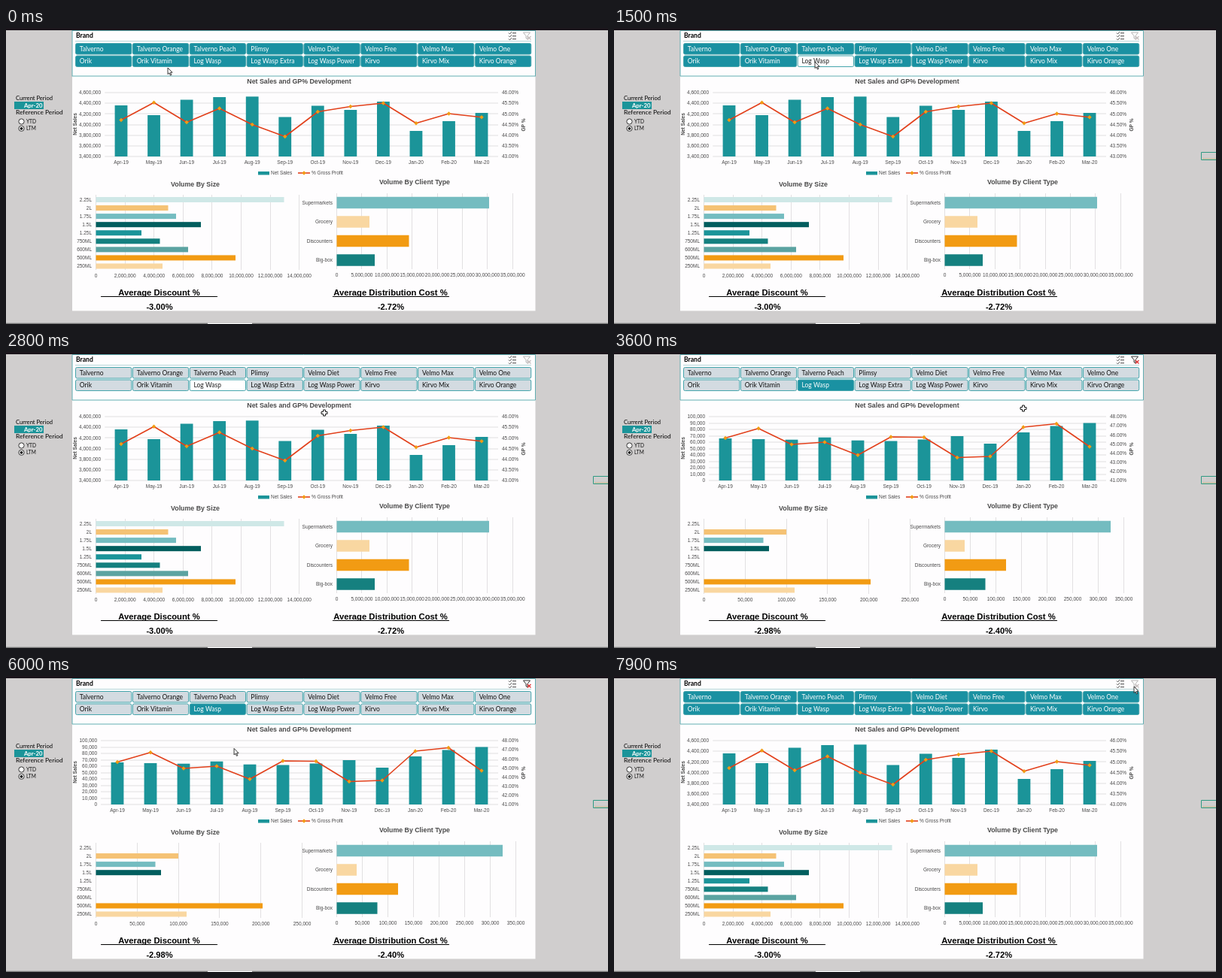
Animation, 800 px wide and 394 px high, one loop 8000 ms. Source, as an HTML page with a canvas:

```html
<!DOCTYPE html>
<html lang="en">
<head>
<meta charset="utf-8">
<title>Sales dashboard</title>
<style>
html, body { margin: 0; width: 100%; height: 100%; overflow: hidden; background: #d0cece; }
canvas { display: block; }
</style>
</head>
<body>
<canvas width="800" height="394"></canvas>
<script>
const ctx = document.querySelector('canvas').getContext('2d');
const TEAL = '#1b9499', BUTTON = '#1a91a2', RED = '#e2401b', GOLD = '#f29b13', INK = '#4a4a4a', GRID = '#e2e0e2';
const ARIAL = '"Liberation Sans", Arial, sans-serif';
const LATO = 'Lato, Carlito, sans-serif';
const MONTHS = 'Apr-19 May-19 Jun-19 Jul-19 Aug-19 Sep-19 Oct-19 Nov-19 Dec-19 Jan-20 Feb-20 Mar-20'.split(' ');
const SIZES = '2.25L 2L 1.75L 1.5L 1.25L 750ML 600ML 500ML 250ML'.split(' ');
const CLIENTS = ['Supermarkets', 'Grocery', 'Discounters', 'Big-box'];
const BRANDS = ['Talverno', 'Talverno Orange', 'Talverno Peach', 'Plimsy', 'Velmo Diet', 'Velmo Free', 'Velmo Max', 'Velmo One',
  'Orik', 'Orik Vitamin', 'Log Wasp', 'Log Wasp Extra', 'Log Wasp Power', 'Kirvo', 'Kirvo Mix', 'Kirvo Orange'];
const PICKED = 10;
const SIZE_COLORS = ['#cfe8e7', '#f5c274', '#74bcc0', '#025e5e', '#1b9499', '#15807f', '#5ba3a1', GOLD, '#f9d7a1'];
const CLIENT_COLORS = ['#74bcc0', '#f9d7a1', GOLD, '#15807f'];

// Bar and line values are pixel positions inside each plot.
const ALL = {
  first: 153, pitch: 43.55,
  sales: { max: 4600000, step: 200000, count: 7 },
  profit: { max: 46, step: .5, count: 7 },
  tops: [103, 116, 95.5, 92, 91.3, 118.5, 103.5, 109, 98, 137, 124, 113],
  line: [122.5, 99.3, 125.5, 107, 128.5, 144.5, 111.5, 104.5, 100, 126.7, 114, 118.7],
  sizes: [369.5, 215.5, 226, 259, 180, 204.5, 242, 305, 208], sizeAxis: [2000000, 7, 38.6],
  clients: [642, 483, 535.5, 490], clientAxis: [5000000, 7, 33.4],
  discount: '-3.00%', cost: '-2.72%'
};
const ONE = {
  first: 148, pitch: 44,
  sales: { max: 100000, step: 10000, count: 11 },
  profit: { max: 48, step: 1, count: 8 },
  tops: [115, 116, 116.7, 113.7, 117.7, 118.5, 116.5, 112, 122, 107, 98.5, 94.5],
  line: [114.5, 101.8, 123, 120, 137.3, 113, 113.5, 140.5, 139, 100, 95.5, 126],
  sizes: [0, 229, 198.5, 206, 0, 0, 0, 341, 240], sizeAxis: [50000, 5, 54.8],
  clients: [660, 466, 521, 493.5], clientAxis: [50000, 7, 34],
  discount: '-2.98%', cost: '-2.40%'
};

// time, x, y of the pointer
const PATH = [[0, 215, 53], [900, 240, 50], [1500, 267, 45], [1900, 267, 45], [2800, 423, 81], [3600, 544, 75],
  [4900, 106, 136], [5500, 112, 138], [6800, 691, 12], [7000, 693, 9], [7900, 691, 14], [8000, 691, 14]];

function rect(x, y, w, h, fill) {
  ctx.fillStyle = fill;
  ctx.fillRect(x, y, w, h);
}
function text(s, x, y, size, { align = 'left', color = INK, bold = false, font = ARIAL } = {}) {
  ctx.font = `${bold ? 'bold ' : ''}${size}px ${font}`;
  ctx.textAlign = align;
  ctx.textBaseline = 'alphabetic';
  ctx.fillStyle = color;
  ctx.fillText(s, x, y + size * .35);
}
function upright(s, x, y) {
  ctx.save();
  ctx.translate(x, y);
  ctx.rotate(-Math.PI / 2);
  text(s, 0, 0, 6.6, { align: 'center', bold: true });
  ctx.restore();
}
function stroke(points, color, width = 1) {
  ctx.beginPath();
  points.forEach(p => ctx.lineTo(...p));
  ctx.strokeStyle = color;
  ctx.lineWidth = width;
  ctx.stroke();
}
function shape(points, fill, outline, width = 1) {
  ctx.beginPath();
  points.forEach(p => ctx.lineTo(...p));
  ctx.closePath();
  ctx.fillStyle = fill;
  ctx.fill();
  if (!outline) return;
  ctx.strokeStyle = outline;
  ctx.lineWidth = width;
  ctx.stroke();
}
function diamond(x, y, r = 2.7) {
  shape([[x, y - r], [x + r, y], [x, y + r], [x - r, y]], GOLD);
}
const title = (s, x, y) => text(s, x, y, 8.8, { align: 'center', bold: true });
const number = n => n.toLocaleString('en-US');

function salesChart(d) {
  title('Net Sales and GP% Development', 389.5, 71);
  const left = d.first - d.pitch / 2;
  const ticks = ({ max, step, count }, draw) => {
    for (let i = 0; i < count; i++) draw(max - i * step, 86 + 85 * i / (count - 1));
  };
  ticks(d.sales, (v, y) => {
    rect(left, Math.round(y) - .5, 654 - left, 1, GRID);
    text(number(v), d === ALL ? 126 : 121, y, 6.5, { align: 'right' });
  });
  ticks(d.profit, (v, y) => text(v.toFixed(2) + '%', 659, y, 6.5));
  upright('Net Sales', 91.5, 128);
  upright('GP %', 688, 129);
  const x = i => d.first + i * d.pitch;
  MONTHS.forEach((m, i) => {
    rect(x(i) - 8.4, d.tops[i], 16.8, 171 - d.tops[i], TEAL);
    text(m, x(i), 179, 6.5, { align: 'center' });
  });
  const points = d.line.map((y, i) => [x(i), y]);
  ctx.lineJoin = 'round';
  stroke(points, RED, 1.6);
  points.forEach(p => diamond(...p));
  rect(335, 191, 15, 4.5, TEAL);
  text('Net Sales', 352, 193, 6.5);
  stroke([[388, 193], [404, 193]], RED, 1.6);
  diamond(396, 193);
  text('% Gross Profit', 406, 193, 6.5);
}

function barChart({ names, ends, colors, axis, x0, y0, pitch, thick, top, bottom, labelY }) {
  const [step, count, gap] = axis;
  for (let i = 0; i <= count; i++) {
    rect(Math.floor(x0 + i * gap), top, 1, bottom - top, GRID);
    text(number(i * step), x0 + i * gap, labelY, 6.5, { align: 'center' });
  }
  names.forEach((name, i) => {
    const y = y0 + i * pitch;
    if (ends[i]) rect(x0, y - thick / 2, ends[i] - x0, thick, colors[i]);
    text(name, x0 - 5.5, y, 6.5, { align: 'right' });
  });
}

function summary(label, value, x, left, valueX) {
  text(label, x, 352, 11.25, { align: 'center', color: '#000', bold: true });
  rect(left, 357, 155, 1, '#000');
  text(value, valueX, 371, 11.1, { align: 'center', color: '#000', bold: true });
}

function charts(d) {
  salesChart(d);
  title('Volume By Size', 251.5, 208);
  barChart({ names: SIZES, ends: d.sizes, colors: SIZE_COLORS, axis: d.sizeAxis,
    x0: 119.5, y0: 228.5, pitch: 11.06, thick: 7, top: 222, bottom: 322, labelY: 330 });
  title('Volume By Client Type', 543, 204.5);
  barChart({ names: CLIENTS, ends: d.clients, colors: CLIENT_COLORS, axis: d.clientAxis,
    x0: 439.5, y0: 232.5, pitch: 25.5, thick: 15.5, top: 220, bottom: 321, labelY: 329 });
  summary('Average Discount %', d.discount, 203.5, 126, 204);
  summary('Average Distribution Cost %', d.cost, 511, 434, 511.5);
}

function filterIcon(active, hover) {
  if (hover) {
    rect(686, 4, 12, 13, '#e0a030');
    rect(687, 5, 10, 11, '#ffd98a');
  }
  const fill = hover ? '#ffd98a' : '#fff';
  shape([[687.5, 6], [696.5, 6], [693, 10.5], [693, 15], [691, 13.5], [691, 10.5]], fill, active ? '#333' : '#b5b5b5');
  const color = active ? '#e03030' : '#c4bcbc';
  stroke([[693, 11], [697.5, 15.5]], color, 1.2);
  stroke([[697.5, 11], [693, 15.5]], color, 1.2);
}

function slicer(mode, active, hover) {
  ctx.strokeStyle = '#62aeb2';
  ctx.lineWidth = 1;
  ctx.strokeRect(88, 3.5, 615.5, 60.5);
  rect(92, 17, 606, 1, '#b4d6d8');
  text('Brand', 93, 10, 8.6, { bold: true, color: '#000', font: LATO });
  for (let i = 0; i < 3; i++) {
    stroke([[668, 6.5 + i * 4], [669.5, 8 + i * 4], [672, 5 + i * 4]], '#444', .9);
    rect(673, 6.2 + i * 4, 5, 1, '#444');
  }
  filterIcon(active, hover);
  BRANDS.forEach((name, i) => {
    const x = 92.5 + i % 8 * 75.85, y = i < 8 ? 20.5 : 37;
    const picked = i === PICKED;
    let fill = BUTTON, color = '#fff';
    if (picked && (mode === 'press' || mode === 'wait')) [fill, color] = ['#fff', '#222'];
    else if (!picked && (mode === 'wait' || mode === 'one')) [fill, color] = ['#d3dbe1', '#111'];
    ctx.beginPath();
    ctx.roundRect(x, y, 74.3, 14.5, 2);
    ctx.fillStyle = fill;
    ctx.fill();
    ctx.strokeStyle = '#45a5ac';
    ctx.lineWidth = 1;
    ctx.stroke();
    text(name, x + 5.3, y + 7.2, 8.5, { color, font: LATO });
  });
}

function sidebar() {
  text('Current Period', 13, 93.5, 7.6, { color: '#000', font: LATO });
  rect(11, 98, 39, 10, TEAL);
  text('Apr-20', 48.5, 103, 7.8, { align: 'right', color: '#fff', bold: true, font: LATO });
  text('Reference Period', 13, 112.5, 8.4, { color: '#000', font: LATO });
  ['YTD', 'LTM'].forEach((s, i) => {
    const y = 124.5 + i * 9.3;
    ctx.beginPath();
    ctx.arc(20.5, y, 3.6, 0, 7);
    ctx.fillStyle = '#fff';
    ctx.fill();
    ctx.strokeStyle = '#222';
    ctx.lineWidth = .9;
    ctx.stroke();
    if (i) {
      ctx.beginPath();
      ctx.arc(20.5, y, 1.9, 0, 7);
      ctx.fillStyle = '#111';
      ctx.fill();
    }
    text(s, 27, y, 6.6, { color: '#111', font: LATO });
  });
}

function pointer(t) {
  const i = PATH.findIndex(p => p[0] > t);
  const [t0, x0, y0] = PATH[i - 1], [t1, x1, y1] = PATH[i];
  const k = (t - t0) / (t1 - t0), e = k * k * (3 - 2 * k);
  ctx.save();
  ctx.translate(x0 + (x1 - x0) * e, y0 + (y1 - y0) * e);
  if (t >= 2100 && t < 3900) {
    const a = 1.4, b = 4;
    shape([[-a, -b], [a, -b], [a, -a], [b, -a], [b, a], [a, a], [a, b], [-a, b], [-a, a], [-b, a], [-b, -a], [-a, -a]], '#fff', '#111');
  } else {
    shape([[0, 0], [0, 8.5], [2, 6.8], [3.4, 10], [4.8, 9.4], [3.4, 6.3], [6, 6.2]], '#fff', '#222', .9);
  }
  ctx.restore();
}

function draw(now) {
  const t = Math.floor(now % 8000 / 100) * 100;
  const filtered = t >= 3200 && t < 7600;
  const mode = t < 1300 || t >= 7500 ? 'all' : t < 1900 ? 'press' : t < 3200 ? 'wait' : 'one';
  rect(0, 0, 800, 394, '#d0cece');
  rect(88, 3, 615.5, 373.5, '#fefdfe');
  rect(0, 0, 800, 3, '#1b151b');
  rect(0, 392.7, 800, 1.3, '#777');
  rect(268, 392.7, 59, 1.3, '#fff');
  sidebar();
  slicer(mode, filtered, t >= 6800 && t < 7600);
  charts(filtered ? ONE : ALL);
  if (t >= 500) {
    ctx.strokeStyle = '#2f9a82';
    ctx.lineWidth = 1;
    ctx.strokeRect(780.5, 165.5, 22, 10);
    rect(782, 173.5, 18, 1, '#c9b98a');
  }
  pointer(t);
  requestAnimationFrame(draw);
}
requestAnimationFrame(draw);
</script>
</body>
</html>
```
